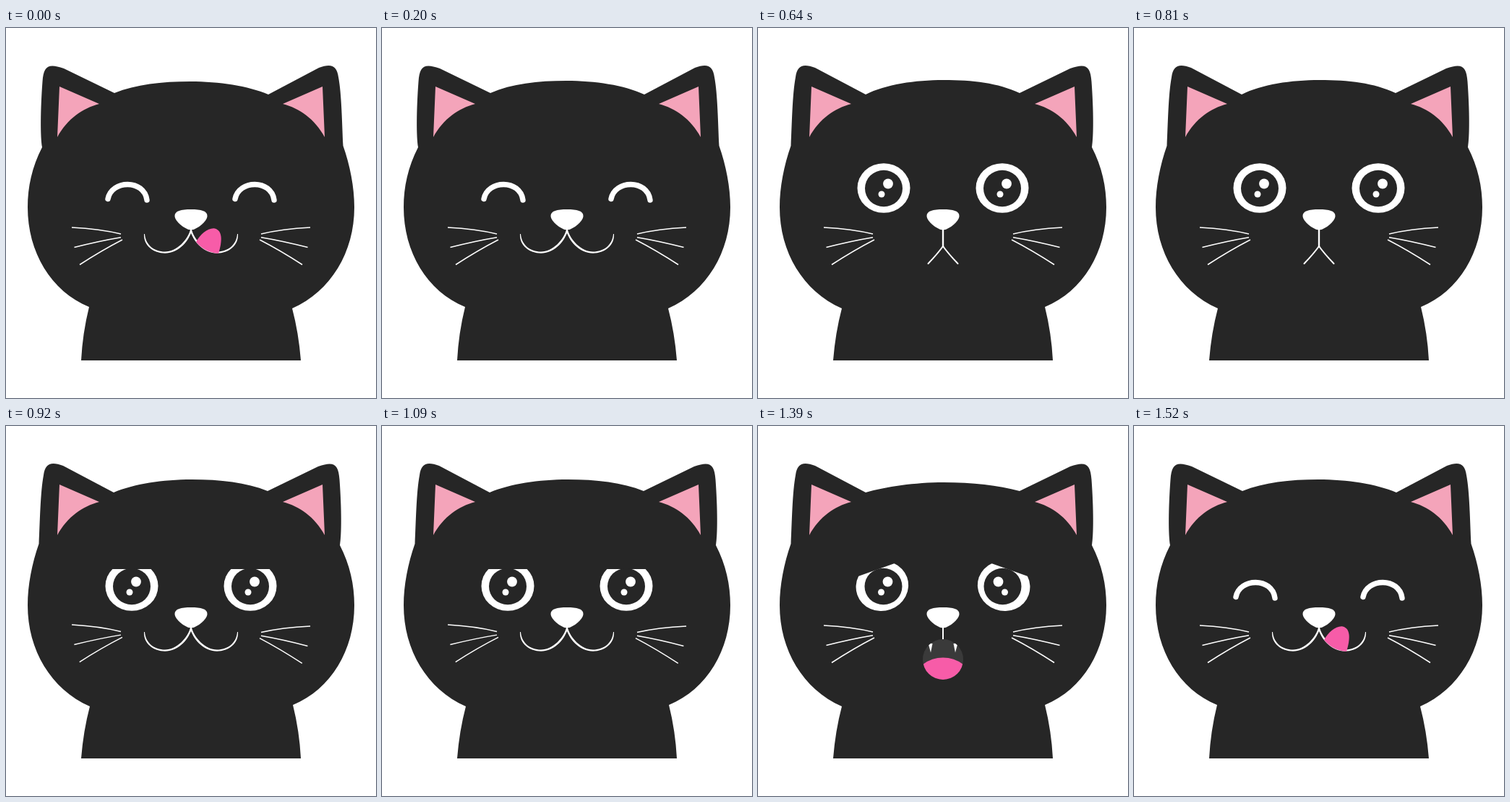
Write an HTML page with a canvas that moves like this. It is 512 by 512 pixels and loops after 1.64 s.

```html
<!DOCTYPE html>
<html lang="en">
<head>
<meta charset="utf-8">
<title>Cat faces</title>
<style>
html, body { margin: 0; width: 100%; height: 100%; overflow: hidden; background: #fff; }
canvas { display: block; width: 100vmin; height: 100vmin; }
</style>
</head>
<body>
<canvas id="stage" width="512" height="512"></canvas>
<script>
const ctx = document.getElementById('stage').getContext('2d');
const FUR = '#262626', WHITE = '#fff', PINK = '#f75ca8', EAR = '#f4a4ba', THROAT = '#3a3a3a';
const TAU = Math.PI * 2;

const fill = (d, color) => {
  ctx.fillStyle = color;
  ctx.fill(new Path2D(d));
};
const stroke = (d, width, cap = 'butt') => {
  ctx.strokeStyle = WHITE;
  ctx.lineWidth = width;
  ctx.lineCap = cap;
  ctx.stroke(new Path2D(d));
};
const ellipse = (x, y, rx, ry, color) => {
  ctx.fillStyle = color;
  ctx.beginPath();
  ctx.ellipse(x, y, rx, ry, 0, 0, TAU);
  ctx.fill();
};
const flip = draw => {
  ctx.save();
  ctx.translate(512, 0);
  ctx.scale(-1, 1);
  draw();
  ctx.restore();
};
const both = draw => { draw(); flip(draw); };

function silhouette(top) {
  fill(`M150 90 C180 ${top + 4} 215 ${top} 255 ${top} C295 ${top} 335 ${top + 6} 363 92
    L433 55 C450 48.5 458 52 460 68 C464.5 92 465 132 466.5 163
    C476 190 482 220 482 248 C482 310 450 364 396 388
    Q405 422 408 460 L104 460 Q106 422 115 386
    C62 364 30 310 30 248 C30 220 36 192 50 165
    C47.5 150 47.5 115 50.5 74 C52 53 58 48 80 56 Z`, FUR);
}

function innerEar() {
  fill('M74 81 L129 105 C106 111 85 125.5 71 151 Z', EAR);
}

function whiskers() {
  stroke('M91 276 Q130 278 159 285 M94.5 303.5 Q130 294.5 159 289.7 M102 327.5 Q132 308 161 293', 1.5);
}

function nose() {
  fill('M256 251 C270 251 278.5 253 278.5 260 C278.5 268 263 279.5 256 279.5 C249 279.5 233.5 268 233.5 260 C233.5 253 242 251 256 251 Z', WHITE);
}

function smile() {
  both(() => fill(`M191 285 C190 301 204 311.7 220 311.7 C237 311.7 251 298 256.7 282
    L256.5 278 L255.3 278 C252 293 236 309.5 220 309.5 C205 309.5 193 300 192 285 Z`, WHITE));
}

const mouths = {
  lick() {
    smile();
    fill('M263 296 C269 285 280 276 289 277.5 C299 280 300 293 294 312 C282 311 271 306 263 296 Z', PINK);
  },
  smile,
  tongue() {
    fill('M256 283 L241 303 C243 315 249 321.5 256 321.5 C263 321.5 269 315 271 303 Z', PINK);
    smile();
  },
  frown() {
    stroke('M256 278 V303', 2.4);
    stroke('M235.5 326 Q248 313 256 302 Q264 313 276.5 326', 2, 'round');
  },
  gasp() {
    stroke('M256 278 V297', 2);
    ctx.save();
    ctx.beginPath();
    ctx.arc(256, 323, 28, 0, TAU);
    ctx.clip();
    ellipse(256, 323, 29, 29, THROAT);
    ellipse(256, 351, 38, 30.6, PINK);
    both(() => fill('M235.5 300.5 L241.5 301 L239 313.5 Z', WHITE));
    ctx.restore();
  }
};

// lid: lid height above the eye centre; tilt: lid angle; look: glint offsets from the iris
function openEye(x, { lid = 50, tilt = 0, look = [-6, 3], iris = x }) {
  ctx.save();
  ctx.translate(x, 222);
  ctx.rotate(tilt);
  ctx.beginPath();
  ctx.rect(-50, -lid, 100, lid + 50);
  ctx.clip();
  ellipse(0, -0.5, 36.5, 34.3, WHITE);
  ctx.restore();
  ellipse(iris, 222, 26, 25.3, FUR);
  ellipse(iris + look[0], 215.5, 6.9, 6.9, WHITE);
  ellipse(iris + look[1], 230, 4.5, 4.5, WHITE);
}

const openEyes = opts => [174, 338].forEach(x => openEye(x, opts));
const right = [6, -3];

const eyes = {
  happy() {
    for (const x of [0, 176])
      stroke(`M${141 + x} 236.5 C${146 + x} 210 ${191 + x} 209 ${195 + x} 238`, 7.4, 'round');
  },
  wide: () => openEyes({}),
  aside: () => openEyes({ look: right }),
  sly: () => openEyes({ look: right, lid: 24 }),
  worried: () => both(() => openEye(172, { look: right, lid: 24.4, tilt: -0.34, iris: 173.5 }))
};

const poses = [
  { until: 200, eyes: 'happy', mouth: 'lick', top: 74 },
  { until: 400, eyes: 'happy', mouth: 'smile', top: 73 },
  { until: 640, eyes: 'wide', mouth: 'tongue', top: 74 },
  { until: 920, eyes: 'aside', mouth: 'frown', top: 72, mirrored: true },
  { until: 1200, eyes: 'sly', mouth: 'smile', top: 74, mirrored: true, twist: 0.006 },
  { until: 1520, eyes: 'worried', mouth: 'gasp', top: 78, mirrored: true },
  { until: 1640, eyes: 'happy', mouth: 'lick', top: 74 }
];
const LOOP = 1640;

function drawCat(pose) {
  ctx.fillStyle = WHITE;
  ctx.fillRect(0, 0, 512, 512);
  const body = () => silhouette(pose.top);
  if (pose.mirrored) flip(body); else body();
  both(innerEar);
  ctx.save();
  ctx.translate(256, 285);
  ctx.rotate(pose.twist || 0);
  ctx.translate(-256, -285);
  both(whiskers);
  ctx.restore();
  eyes[pose.eyes]();
  mouths[pose.mouth]();
  nose();
}

const start = performance.now();
function tick() {
  const t = (performance.now() - start) % LOOP;
  drawCat(poses.find(p => t < p.until));
  requestAnimationFrame(tick);
}
tick();
</script>
</body>
</html>
```
